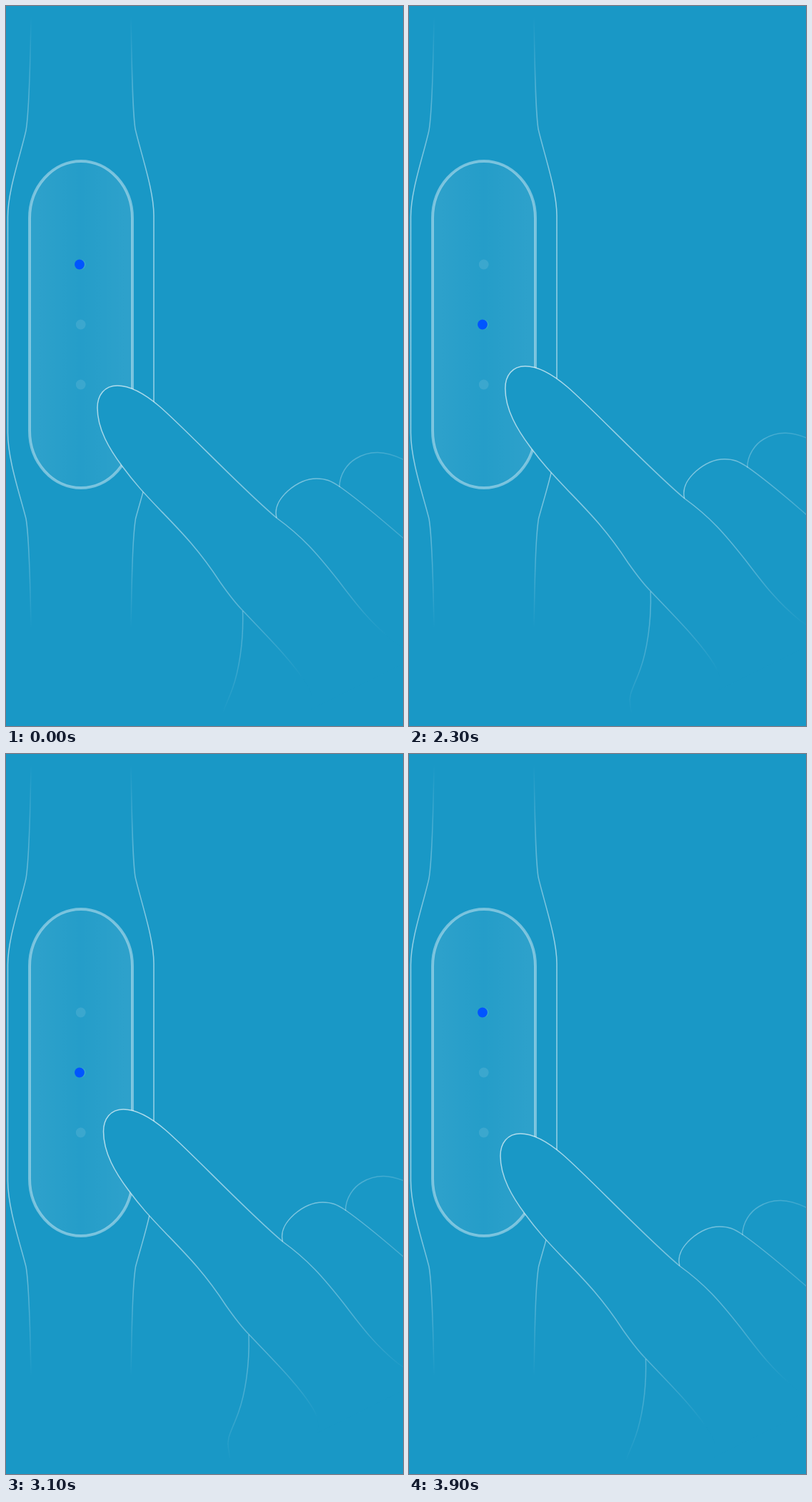
Recreate the animation shown at these times as an HTML page with a canvas. Size 556 by 1007 pixels, loop 4000 ms.

```html
<!DOCTYPE html>
<html lang="en">
<head>
<meta charset="utf-8">
<title>Tap the band</title>
<style>
html, body { margin: 0; width: 100%; height: 100%; overflow: hidden; background: #1998c6; }
canvas { display: block; }
</style>
</head>
<body>
<canvas id="stage" width="556" height="1007"></canvas>
<script>
const ctx = document.getElementById('stage').getContext('2d');
const BG = '#1998c6';
const LOOP = 4000, STEP = 100, RESTART = 39;
const DOT_Y = [361.5, 445.5, 529.5];
const BOUNCE = [0, 1, 2, 1];
const LIFT = { x: 8.5, y: -34, from: 18, to: 25 };

const white = a => `rgba(255,255,255,${a})`;

function fade(x0, y0, x1, y1, ...stops) {
  const g = ctx.createLinearGradient(x0, y0, x1, y1);
  stops.forEach(([at, a]) => g.addColorStop(at, white(a)));
  return g;
}

const wrist = [
  'M35 15C34 80 32 150 28 174C20 210 2.5 258 2.5 295V597C2.5 635 20 685 28 717C32 740 34 810 35 870',
  'M175 15C176 80 177 145 181 172C190 210 207 258 207 293V600C207 635 190 685 181.5 717C177 745 176 810 175 870'
].map(d => new Path2D(d));

const panel = new Path2D('M33 297A72 80 0 0 1 177 297V594A72 80 0 0 1 33 594Z');

const index =
  'C490 836 510 862 540 886L575 911';
const tip =
  'C435 765 415 742 379 716C330 675 250 590 215 560C195 543 174 531 156 531' +
  'C138 531 128 544 128 562C128 592 145 620 163 644C180 667 192 680 215 704' +
  'C245 735 270 760 300 806C312 823 322 836 332 846' +
  'C365 881 400 915 420 947C428 960 431 970 427 984';
const finger = new Path2D('M575 911L540 886C510 862 490 836 465 803' + tip);
const middle = new Path2D('M379 716C375 700 384 688 395 678C410 665 424 661 435 661C448 661 455 664 467 672C500 695 530 722 556 744L575 760');
const ring = new Path2D('M467 673C467 655 478 640 490 633C510 621 530 622 556 634L575 645');
const thumb = new Path2D('M331.5 846C333 890 326 930 317 955C308 980 300 990 303 1005L305 1019');

const wristInk = fade(0, 15, 0, 870, [0, 0], [0.18, 0.36], [0.3, 0.55], [0.7, 0.55], [0.83, 0.36], [1, 0]);
const panelInk = fade(33, 0, 177, 0, [0, 0.095], [0.5, 0.05], [1, 0.095]);
// Fades run along (1, 2), towards the lower right of the stage.
const fingerInk = fade(156, 531, 372, 963, [0, 0.65], [0.5, 0.42], [0.75, 0.27], [1, 0]);
const middleInk = fade(379, 690, 556, 770, [0, 0.45], [0.4, 0.33], [1, 0.15]);
const ringInk = fade(467, 0, 570, 0, [0, 0.27], [1, 0.12]);
const thumbInk = fade(0, 835, 0, 990, [0, 0.28], [0.5, 0.18], [1, 0]);

function line(path, ink, width = 1.5) {
  ctx.strokeStyle = ink;
  ctx.lineWidth = width;
  ctx.stroke(path);
}

// Moves a shape while its ink stays fixed to the stage.
function moved(path, x, y) {
  const p = new Path2D();
  p.addPath(path, new DOMMatrix().translate(x, y));
  return p;
}

function dot(x, y, ink) {
  ctx.fillStyle = ink;
  ctx.beginPath();
  ctx.arc(x, y, 6.9, 0, Math.PI * 2);
  ctx.fill();
}

function drawBand(lit) {
  wrist.forEach(p => line(p, wristInk));
  ctx.fillStyle = panelInk;
  ctx.fill(panel);
  line(panel, white(0.4), 4);
  DOT_Y.forEach(y => dot(104.7, y, white(0.1)));
  dot(103, DOT_Y[lit], '#0055ff');
}

function drawHand(k) {
  const shift = p => moved(p, LIFT.x * k, LIFT.y * k);
  const f = shift(finger);
  ctx.fillStyle = BG;
  ctx.fill(f);
  line(shift(ring), ringInk);
  line(shift(middle), middleInk);
  line(shift(thumb), thumbInk);
  line(f, fingerInk);
}

function draw(ms) {
  const step = Math.floor(ms % LOOP / STEP) % RESTART;
  const u = Math.min(1, Math.max(0, (step - LIFT.from) / (LIFT.to - LIFT.from)));
  ctx.fillStyle = BG;
  ctx.fillRect(0, 0, 556, 1007);
  drawBand(BOUNCE[step % 4]);
  drawHand(u * u * (3 - 2 * u));
}

const start = performance.now();
function tick() {
  draw(performance.now() - start);
  requestAnimationFrame(tick);
}
tick();
</script>
</body>
</html>
```
